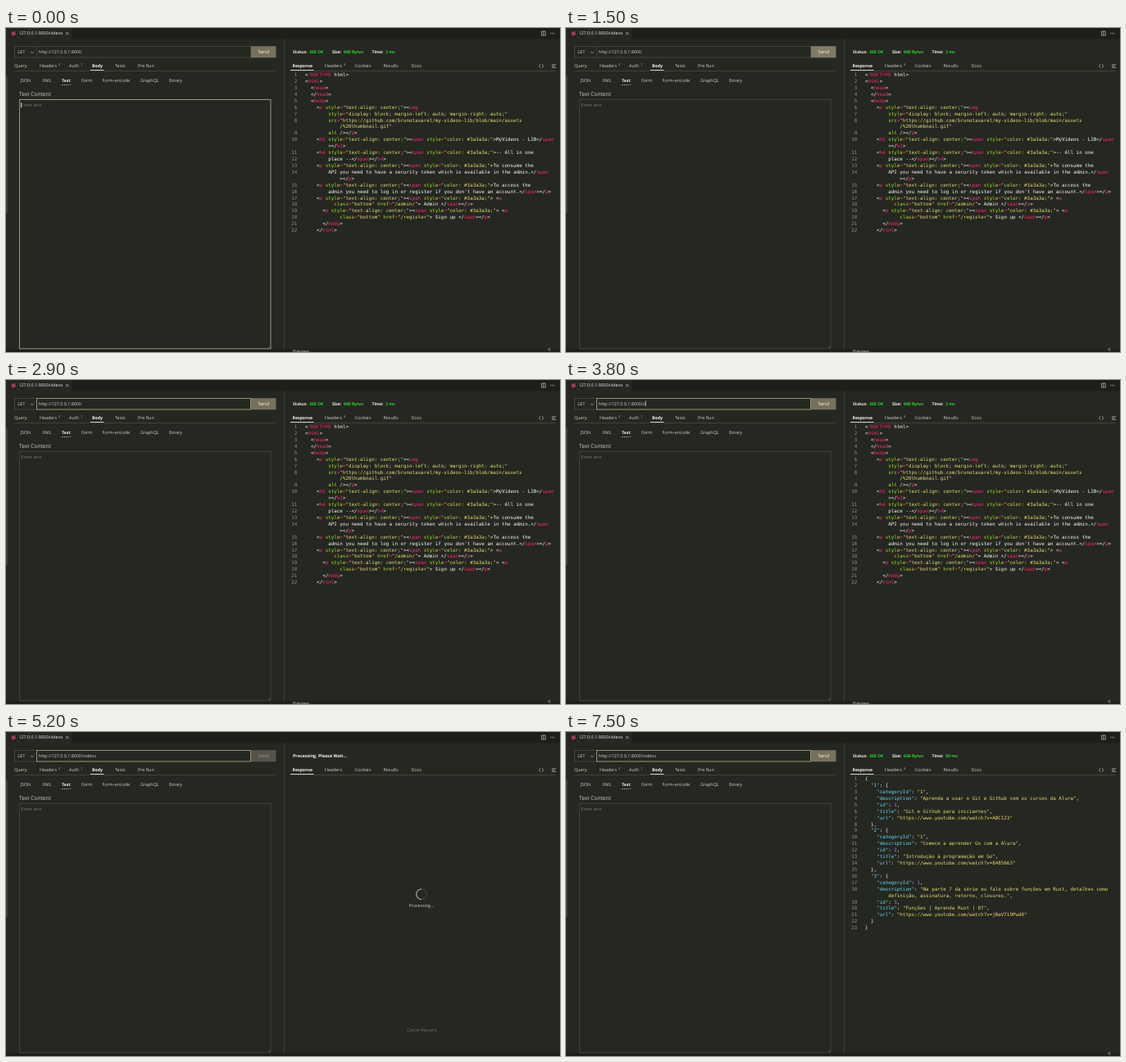
Write an HTML page that moves like this. It is 676 px wide and 396 px high and loops after 8 s.

```html
<!DOCTYPE html>
<html lang="en">
<head>
<meta charset="utf-8">
<title>API client</title>
<style>
html, body { margin: 0; width: 100%; height: 100%; overflow: hidden; background: #252721; }
svg { display: block; width: 676px; height: 396px; }
text { font: 5.4px "Open Sans", "Noto Sans", sans-serif; fill: #d0d0ca; text-rendering: geometricPrecision; white-space: pre; }
.code text { font: 5.86px "DejaVu Sans Mono", monospace; fill: #f8f8f2; }
.code .num { fill: #90908a; text-anchor: end; }
.tag { fill: #f92672; }
.attr { fill: #a6e22e; }
.str { fill: #e6db74; }
.key { fill: #66d9ef; }
.val { fill: #ae81ff; }
.on { font-weight: 700; fill: #f4f4ee; }
.ok { fill: #2bd32b; }
.dim { fill: #77786f; }
.sup { font-size: 3.8px; }
.line { fill: none; stroke: #414339; }
.icon { fill: none; stroke: #c5c5bf; stroke-width: .7; }
</style>
</head>
<body>
<svg viewBox="0 0 676 396" xmlns="http://www.w3.org/2000/svg">
  <rect width="676" height="396" fill="#252721"/>
  <rect width="676" height="13.5" fill="#1e1f1c"/>
  <rect width="80" height="14" fill="#252721"/>
  <rect y="392.5" width="676" height="3.5" fill="#1e1f1c"/>
  <rect y="58" width="1.6" height="168" fill="#484943"/>
  <path class="line" d="M339.5 14V392.5M10 52.5H329.5M347 52.5H671"/>
  <rect x="7" y="4.5" width="4.5" height="4.5" fill="#a33a62"/>
  <path class="icon" d="M73 5l3.4 3.4M76.400 5l-3.400 3.400M653.500 4.200h4.800v4.800h-4.800zM655.900 4.200v4.800"/>
  <path d="M664 6.700h1M666 6.700h1M668 6.700h1" stroke="#c5c5bf"/>
  <path class="icon" d="M30.300 28.700l1.800 1.800l1.800-1.800M666 44.800h5M666 46.600h3.500M666 48.400h5"/>
  <rect class="line" x="10.5" y="22.500" width="27" height="13.500"/>
  <rect id="send" x="298.500" y="22.200" width="31" height="14.100"/>
  <rect id="urlBox" class="line" x="37.500" y="22.500" width="261" height="13.500"/>
  <rect id="area" class="line" x="16.500" y="87.500" width="306.500" height="304.500"/>
  <path class="icon" d="M320.300 391l2-2" opacity=".7"/>
  <path d="M103 51.500h16.500M347 51.500h28.500" stroke="#c8c8c0"/>
  <path d="M68 69.500h11.500" stroke="#a0a098" stroke-dasharray="1 .6"/>
  <g id="ui"></g>
  <rect id="caret" width=".8" height="6.500" fill="#e8e8e2"/>
  <g id="page" class="code"></g>
  <g id="json" class="code"></g>
  <g id="busy">
    <circle cx="507" cy="198.300" r="6.300" fill="none" stroke="#41433b" stroke-width="1.100"/>
    <path id="arc" d="M507 204.600a6.300 6.300 0 0 1 0-12.600" fill="none" stroke="#a5a59d" stroke-width="1.100"/>
  </g>
  <path id="up" class="icon" d="M662 394.500v-2.500h2.500M662 392l3 3" opacity=".7"/>
</svg>
<script>
const $ = id => document.getElementById(id);
const NS = 'http://www.w3.org/2000/svg';

function label(parent, x, y, str, cls = '', size) {
  const el = document.createElementNS(NS, 'text');
  el.setAttribute('x', x);
  el.setAttribute('y', y);
  if (cls) el.setAttribute('class', cls);
  if (size) el.style.fontSize = size + 'px';
  el.textContent = str;
  parent.append(el);
  return el;
}
const ui = (...args) => label($('ui'), ...args);
const row = (y, items) => items.forEach(([x, str, cls, size]) => ui(x, y, str, cls, size));

ui(15.5, 8.400, '127.0.0.1:5000/videos', '', 5.3).style.fill = '#f0f0ea';
ui(14, 31.400, 'GET', '', 5.1);
const url = ui(40, 30.700, '', '', 5.35);
const sendText = ui(307.500, 31.400, 'Send', '', 5.8);
row(47.900, [[10, 'Query'], [41, 'Headers'], [77, 'Auth'], [105, 'Body', 'on', 5.2], [133, 'Tests'],
  [161, 'Pre Run'], [349.500, 'Response', 'on', 5.2], [389, 'Headers'], [425.500, 'Cookies'],
  [460.500, 'Results'], [494.500, 'Docs'], [650, '{ }', '', 6]]);
ui(64, 46, '2', 'sup');
ui(91, 46, '1', 'sup');
const count = ui(412, 46, '5', 'sup');
row(66.300, [[17.500, 'JSON'], [44.500, 'XML'], [68, 'Text', 'on', 5.1], [92, 'Form'],
  [117.500, 'Form-encode'], [164, 'GraphQL'], [199, 'Binary']]);
ui(16, 82.500, 'Text Content', '', 6.6);
ui(18.500, 95.500, 'Enter text', 'dim', 5.5);

const status = [[350, 'Status:'], [398, 'Size:'], [446.500, 'Time:']].map(([x, s]) => ui(x, 31.400, s, 'on', 5.1));
const values = [370, 412, 463].map(x => ui(x, 31.400, '', 'on ok', 5.1));
const wait = ui(350, 31.400, 'Processing, Please Wait...', 'on', 5.3);
const preview = ui(350, 397.300, 'Preview:', '', 5.4);
label($('busy'), 491.500, 214.200, 'Processing...', '', 5.3);
label($('busy'), 489, 365.500, 'Cancel Request', 'dim', 5.15);

// Rows: [indent, text]; a leading "~" marks a wrapped row without a number.
const P = '<p style="text-align: center;">';
const S = '<span style="color: #3a3a3a;">';
const html = [
  [0, '<!DOCTYPE html>'], [0, '<html>'], [2, '<head>'], [2, '</head>'], [2, '<body>'],
  [4, P + '<img'],
  [8, 'style="display: block; margin-left: auto; margin-right: auto;"'],
  [8, 'src="https://github.com/brunotavarel/my-videos-lib/blob/main/assets'],
  [12, '~/%20thumbnail.gif"'],
  [8, 'alt /></p>'],
  [4, P.replace('p', 'h2') + S + 'MyVideos - LIB</span'], [8, '~></h2>'],
  [4, P.replace('p', 'h4') + S + '-- All in one'], [8, 'place --</span></h4>'],
  [4, P + S + 'To consume the'],
  [8, 'API you need to have a security token which is available in the admin.</span'], [12, '~></p>'],
  [4, P + S + 'To access the'],
  [8, "admin you need to log in or register if you don't have an account.</span></p>"],
  [4, P + S + ' <a'], [10, 'class="bottom" href="/admin/"> Admin </span></p>'],
  [6, P + S + ' <a'], [12, 'class="bottom" href="/register"> Sign up </span></p>'],
  [6, '</body>'], [4, '</html>']
];

const watch = 'https://www.youtube.com/watch?v=';
const entry = (n, cat, desc, title, id, more) => [
  [2, `"${n}": {`], [4, `"categoryId": ${cat},`], [4, `"description": "${desc}`],
  ...(more ? [[8, '~' + more]] : []),
  [4, `"id": ${n},`], [4, `"title": "${title}",`], [4, `"url": "${watch}${id}"`],
  [2, n < 3 ? '},' : '}']
];
const json = [
  [0, '{'],
  ...entry(1, '"1"', 'Aprenda a usar o Git e Github com os cursos da Alura",', 'Git e Github para iniciantes', 'ABC123'),
  ...entry(2, '"1"', 'Comece a aprender Go com a Alura",', 'Introdução à programação em Go', '8485663'),
  ...entry(3, '1', 'Na parte 7 da série eu falo sobre funções em Rust, detalhes como',
    'Funções | Aprenda Rust | 07', 'jNaVT19Pwd0', 'definição, assinatura, retorno, closures.",'),
  [0, '}']
];

const htmlRules = [
  ['str', /^("[^"]*"?|\/%20[^"]*")/], ['', /^<\/?/], ['tag', /^(!DOCTYPE|(?<=<\/?)\w+)/],
  ['attr', /^(\w+(?==")|alt(?= \/))/], ['tag', /^=(?=")/], ['', /^(\w+|.)/]
];
const jsonRules = [
  ['key', /^"\w+"(?=:)/], ['str', /^("[^"]*"?|definição[^"]*")/], ['val', /^\d+/], ['', /^./]
];

function paint(group, rows, rules) {
  let num = 0;
  rows.forEach(([indent, raw], i) => {
    const y = 59.100 + i * 7.917;
    const wrapped = raw[0] === '~';
    const str = wrapped ? raw.slice(1) : raw;
    if (!wrapped) label(group, 355.300, y, ++num, 'num');
    const el = label(group, 365 + indent * 3.528, y, '');
    for (let at = 0; at < str.length;) {
      const prev = str.slice(0, at).match(/<\/?$/);
      const rest = str.slice(at);
      let cls = '', hit = '';
      for (const [name, re] of rules) {
        const m = prev && /^\w/.test(rest) ? rest.match(/^\w+/) : rest.match(re);
        if (m) { cls = prev && /^\w/.test(rest) ? 'tag' : name; hit = m[0]; break; }
      }
      const span = document.createElementNS(NS, 'tspan');
      if (cls) span.setAttribute('class', cls);
      span.textContent = hit;
      el.append(span);
      at += hit.length;
    }
  });
}
paint($('page'), html, htmlRules);
paint($('json'), json, jsonRules);

const LOOP = 8000;
const typed = [[3500, 1], [3800, 2], [4000, 3], [4100, 4], [4300, 5], [4400, 7]];
const areaCaret = [[0, 100], [700, 1300]];
const urlCaret = [[2300, 2900], [3500, 5100], [5700, 6300], [6900, 7500]];
const within = (t, spans) => spans.some(([a, b]) => t >= a && t < b);
const show = (el, on) => el.style.display = on ? '' : 'none';

function draw(t) {
  const busy = t >= 5200 && t < 5400;
  const done = t >= 5400;
  const hover = t >= 1200 && t < 2000;
  const n = typed.reduce((len, [at, k]) => t >= at ? k : len, 0);
  url.textContent = 'http://127.0.0.1:8000' + '/videos'.slice(0, n);

  $('area').style.stroke = t < 1500 ? '#99947c' : '#414339';
  $('urlBox').style.stroke = t >= 2300 ? '#99947c' : '#414339';
  $('send').style.fill = busy ? '#56544a' : hover ? '#7f7b66' : '#75715e';
  sendText.style.fill = busy ? '#96958b' : '#f8f8f2';

  const inArea = within(t, areaCaret);
  show($('caret'), inArea || within(t, urlCaret));
  $('caret').setAttribute('x', inArea ? 18.200 : 40.200 + url.getComputedTextLength());
  $('caret').setAttribute('y', inArea ? 91 : 25.500);

  show($('page'), !busy && !done);
  show($('json'), done);
  show($('busy'), busy);
  show(wait, busy);
  show(count, !busy);
  show($('up'), !busy);
  show(preview, !busy && !done);
  [...status, ...values].forEach(el => show(el, !busy));
  const reply = done ? ['200 OK', '656 Bytes', '50 ms'] : ['200 OK', '988 Bytes', '3 ms'];
  values.forEach((el, i) => el.textContent = reply[i]);
  $('arc').setAttribute('transform', `rotate(${(t - 5200) * .36} 507 198.300)`);
}

const start = performance.now();
function tick() {
  draw((performance.now() - start) % LOOP);
  requestAnimationFrame(tick);
}
draw(0);
tick();
</script>
</body>
</html>
```
